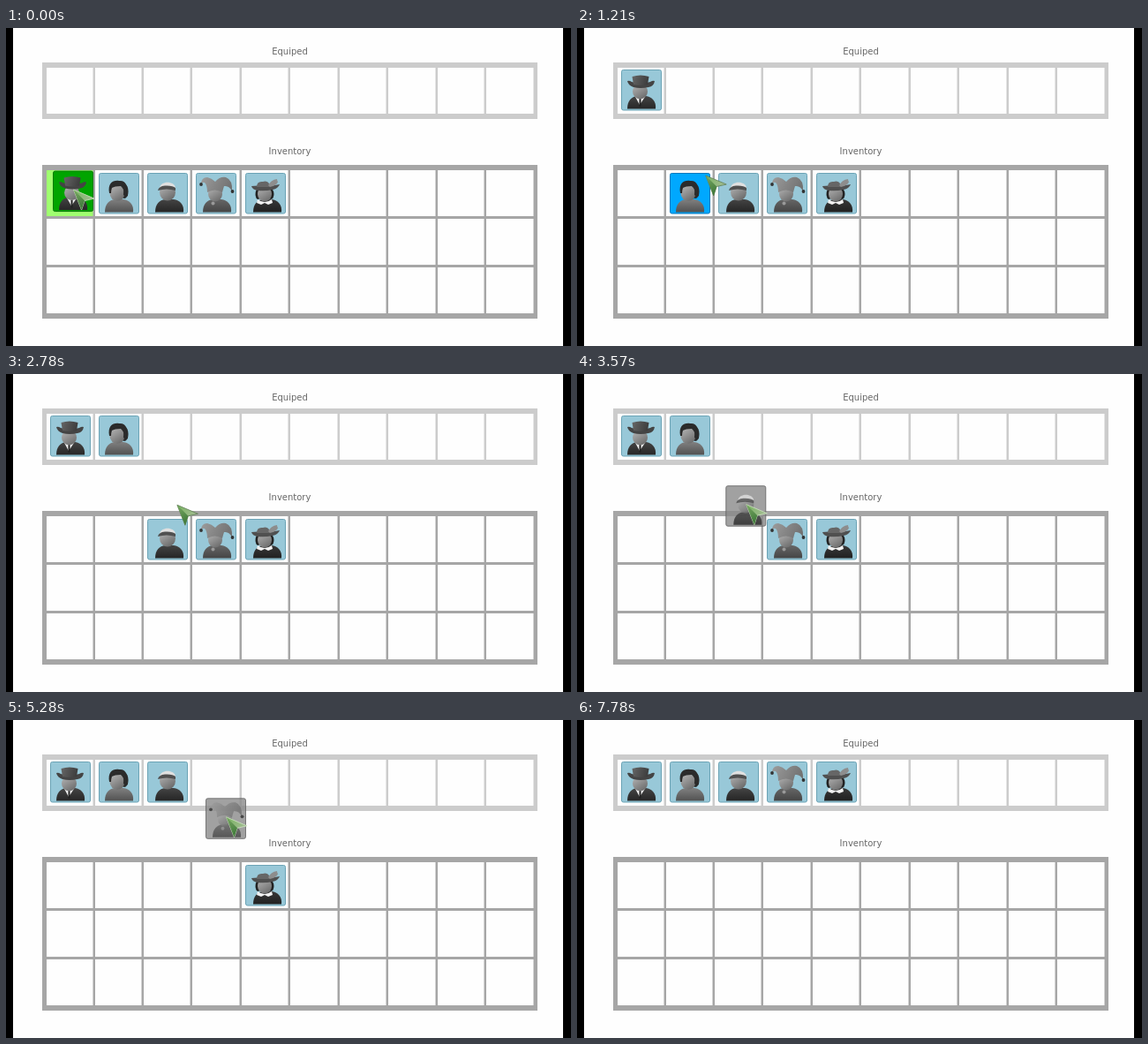
Animation, 640 px wide and 360 px high, one loop 7920 ms. Source, as an HTML page with a canvas:

```html
<!DOCTYPE html>
<html lang="en">
<head>
<meta charset="utf-8">
<title>Inventory drag and drop</title>
<style>
html, body { margin: 0; width: 100%; height: 100%; overflow: hidden; background: #000; }
canvas { display: block; }
</style>
</head>
<body>
<canvas id="stage" width="640" height="360"></canvas>
<script>
const ctx = document.getElementById('stage').getContext('2d');
const LOOP = 7920, FPS = 14, PAUSE = 140;
const CELL_H = 52, ROW = 55, GAP = 2.5, EQUIP_Y = 45, INV_Y = 161, TILE = 46;

const cellX = n => 46 + Math.floor(n * 55.45 - .4 * Math.sign(n));
const cellW = n => cellX(n + 1) - GAP - cellX(n);

// When each hat is picked up and dropped
const drags = [[-70, 700], [1540, 2340], [3210, 4270], [4990, 5610], [6570, 7270]];

const home = i => [cellX(i) + 29.5, 187];
const slot = i => [cellX(i) + 29.5, 72];
const leg = (start, end, from, to, bow) => ({ start, end, from, to, bow });

// Carry each hat up, then swing back down to the next one
const legs = drags.flatMap(([grab, drop], i) => {
  const next = drags[i + 1];
  return [
    leg(grab, drop - PAUSE, home(i), slot(i), 9),
    next ? leg(drop, next[0] - PAUSE, slot(i), home(i + 1), 27)
      : leg(drop + 220, LOOP - 110, slot(i), [home(i)[0], 400], 15)
  ];
});

function pointer(t) {
  const { start, end, from, to, bow } = legs.findLast(l => t >= l.start);
  const u = Math.min(1, (t - start) / (end - start)), e = u * u * (3 - 2 * u);
  return [
    from[0] + (to[0] - from[0]) * e + bow * Math.sin(Math.PI * u ** 1.5),
    from[1] + (to[1] - from[1]) * e
  ];
}

function rect(x, y, w, h, color) {
  ctx.fillStyle = color;
  ctx.fillRect(x, y, w, h);
}

function shape(d, fill, stroke, width = 1) {
  const p = new Path2D(d);
  if (fill) { ctx.fillStyle = fill; ctx.fill(p); }
  if (stroke) { ctx.strokeStyle = stroke; ctx.lineWidth = width; ctx.stroke(p); }
}

function oval(x, y, rx, ry, fill) {
  ctx.beginPath();
  ctx.ellipse(x, y, rx, ry, 0, 0, 7);
  ctx.fillStyle = fill;
  ctx.fill();
}

function fade(x0, y0, x1, y1, from, to) {
  const g = ctx.createLinearGradient(x0, y0, x1, y1);
  g.addColorStop(0, from);
  g.addColorStop(1, to);
  return g;
}

const head = (x, y, rx, ry) => oval(x, y, rx, ry, fade(x - 6, y - 9, x + 6, y + 9, '#b4b4b4', '#666'));

function body(x, from, to) {
  ctx.save();
  ctx.translate(x, 0);
  shape('M-16 44.5C-16 35-11 31-5 30H5C12 31 17 36 16 44.5Z', fade(0, 30, 0, 45, from, to));
  ctx.restore();
}

const figures = [
  () => { // top hat
    body(23, '#444', '#262626');
    shape('M16 31L21 40 27 31Z', '#eee');
    shape('M20.5 33H22.5V42H20.5Z', '#222');
    head(21.5, 25, 8.5, 8.5);
    shape('M7 13Q9 12 12 14Q22 17 33 14Q36 12 38 13Q37 19 31 20Q22 22 14 20Q8 18 7 13Z', '#444');
    shape('M14 17L12.5 8Q22 5 31.5 8L30 17Q22 19 14 17Z', fade(12, 8, 32, 14, '#666', '#3a3a3a'));
  },
  () => { // bob
    oval(29, 21, 4.5, 8, '#2b2b2b');
    body(23, '#808080', '#505050');
    head(21, 23, 8.5, 9);
    shape('M12 23C10 12 16 8 23 9C31 8 34 16 33 26Q30 28 28 25Q29 17 25 15Q18 15 15 17Q14 20 14 23Z', '#2b2b2b');
  },
  () => { // visor
    body(25, '#444', '#242424');
    head(23, 22, 9, 9.5);
    shape('M14 17C15 8.5 31 8.5 32 17Z', '#e0e0e0');
    shape('M12 20Q13 15 20 14.5Q29 14 32 17V20Q22 17 12 20Z', '#505050');
  },
  () => { // jester
    body(24, '#666', '#444');
    head(22, 24, 8, 8.5);
    shape('M13 22Q13 14 10 11Q7 10 6 13Q6 5 13 5Q18 6 22 10Q27 4 34 5Q42 8 41 21Q38 14 32 15Q31 18 30 22Q22 17 13 22Z',
      fade(8, 6, 38, 22, '#999', '#707070'));
    oval(6, 13, 1.9, 1.9, '#333');
    oval(41.5, 21, 1.9, 1.9, '#333');
    oval(19.5, 34.5, 2, 2, '#999');
  },
  () => { // feathered hat
    oval(14.5, 24, 3, 6, '#222');
    oval(29, 24, 3.5, 6, '#222');
    body(25, '#383838', '#202020');
    shape('M14 30Q22 36 30 30L31 34 26 36 22 34 18 36 13 34Z', '#f2f2f2');
    head(22, 24, 8, 8.5);
    shape('M7 15Q14 14 22 15Q31 15 39 13Q37 18 31 19Q22 21 14 20Q8 19 7 15Z', '#505050');
    shape('M13 16Q13 9 20 10Q27 8 28 16Z', '#666');
    shape('M26 14Q29 8 36 7Q36 9 37 10Q36 14 28 16Z', '#8d8d8d');
  }
];

const looks = {
  idle: ['#98c8d8', '#6ba3b5', 1],
  hover: ['#00a8ff', '#0878bd', 1],
  accept: ['#00a400', '#087a08', 1],
  loose: ['#8a8a8a', '#606060', .8]
};

function tile(i, x, y, look) {
  const [fill, border, alpha] = looks[look];
  ctx.save();
  ctx.globalAlpha = alpha;
  ctx.translate(x, y);
  ctx.beginPath();
  ctx.roundRect(.5, .5, TILE - 1, TILE - .5, 2);
  ctx.fillStyle = fill;
  ctx.fill();
  ctx.strokeStyle = border;
  ctx.lineWidth = 1;
  ctx.stroke();
  figures[i]();
  ctx.restore();
}

const inside = ([px, py], x, y, w, h) => px >= x && px <= x + w && py >= y && py <= y + h;

function grid(y, rows, color, target) {
  rect(41, y - 6, 561, rows * ROW + 9, color);
  for (let n = 0; n < rows * 10; n++) {
    const col = n % 10, cell = [cellX(col), y + Math.floor(n / 10) * ROW, cellW(col), CELL_H];
    const lit = target && inside(target, ...cell);
    rect(...cell, lit ? '#a0ff70' : '#fefefe');
  }
}

function cursor([x, y], pressed) {
  ctx.save();
  ctx.translate(x, y);
  shape('M0 0L23.5 10 12.5 12.5 9 23Z', fade(3, 3, 20, 14, '#7fb568', '#a3bc93'), pressed ? '#cfe6c2' : '#5f7d55', .8);
  shape('M0 0L12.5 12.5 9 23Z', fade(2, 4, 11, 20, '#6f9f5c', '#3f7a3a'));
  ctx.restore();
}

function label(text, y) {
  ctx.fillStyle = '#666';
  ctx.fillText(text, 321.5, y);
}

function draw(t) {
  const tip = pointer(t);
  const held = drags.findIndex(([grab, drop]) => t >= grab && t < drop);
  const target = held >= 0 ? tip : null;

  rect(0, 0, 640, 360, '#000');
  rect(8, 0, 623, 360, '#fefefe');
  ctx.font = '10px "DejaVu Sans", sans-serif';
  ctx.textAlign = 'center';
  label('Equiped', 30);
  label('Inventory', 143);
  grid(EQUIP_Y, 1, '#ccc', target);
  grid(INV_Y, 3, '#a6a6a6', target);

  drags.forEach(([, drop], i) => {
    if (i === held) return;
    const x = cellX(i) + 4, y = t >= drop ? 47 : 164;
    const over = held < 0 && inside(tip, x, y, TILE, TILE);
    tile(i, x, y, over ? 'hover' : 'idle');
  });

  if (held >= 0) {
    const overCell = tip[1] >= INV_Y || tip[1] <= EQUIP_Y + CELL_H;
    tile(held, tip[0] - 23.5, tip[1] - 21.5, overCell ? 'accept' : 'loose');
  }
  cursor(tip, held >= 0);
}

function tick() {
  const t = performance.now() % LOOP;
  draw(Math.floor((t + 10) * FPS / 1000) * 1000 / FPS);
  requestAnimationFrame(tick);
}
tick();
</script>
</body>
</html>
```
